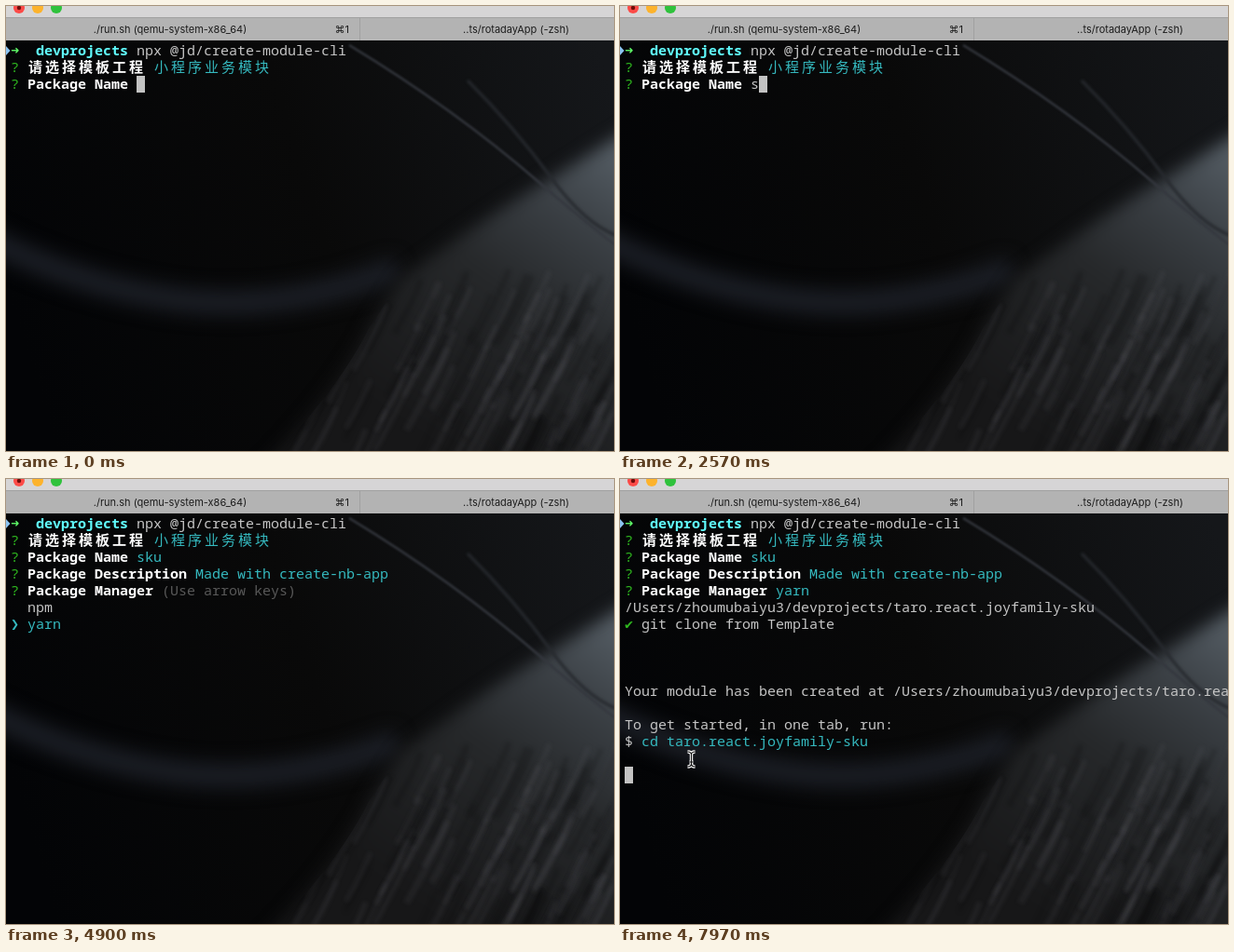
Write an HTML page with a canvas that moves like this. It is 652x478 px and loops after 8000 ms.

```html
<!DOCTYPE html>
<html lang="zh">
<head>
<meta charset="utf-8">
<title>Module generator in a terminal</title>
<style>
html, body { margin: 0; width: 100%; height: 100%; overflow: hidden; background: #050506; }
canvas { display: block; }
</style>
</head>
<body>
<canvas id="stage" width="652" height="478"></canvas>
<script>
const W = 652, H = 478, LOOP = 8000;
const CELL = 9, LINE = 18, LEFT = 5, TOP = 39;
const MONO = '"Noto Sans Mono", "DejaVu Sans Mono", "Noto Sans CJK SC", "Noto Sans CJK", monospace';
const COLOR = {
  plain: '#c5c5c5', bold: '#ffffff', teal: '#35b9bf', green: '#2fb81f',
  dim: '#585858', path: '#60fdff', arrow: '#5ffa68'
};
const WORKSPACE = 'devprojects';
const PROJECT = 'taro.react.joyfamily-sku';
const FOLDER = `/Users/zhoumubaiyu3/${WORKSPACE}/${PROJECT}`;

// Moments in the session, in ms
const NAMED = 3750, DESCRIBED = 4250, PICK_YARN = 4560, CLONE = 5080, DONE = 6050, POINTER = 6300;
const TYPING = [[0, ''], [900, 's'], [1050, 'sd'], [1350, 'sdk'], [1500, 'sdku'],
  [2100, 'sdk'], [2250, 'sd'], [2400, 's'], [2800, 'sk'], [2950, 'sku']];

const ctx = document.getElementById('stage').getContext('2d');
const backdrop = makeBackdrop();

function makeBackdrop() {
  const canvas = document.createElement('canvas');
  canvas.width = W;
  canvas.height = H;
  const c = canvas.getContext('2d');

  const gradient = (x0, y0, x1, y1, ...stops) => {
    const g = c.createLinearGradient(x0, y0, x1, y1);
    stops.forEach(([pos, color]) => g.addColorStop(pos, color));
    return g;
  };
  const stroke = (path, color, width, blur) => {
    c.filter = `blur(${blur}px)`;
    c.strokeStyle = color;
    c.lineWidth = width;
    c.stroke(new Path2D(path));
  };

  c.fillStyle = gradient(0, 300, W, 100, [0, '#030406'], [.5, '#090909'], [1, '#15171a']);
  c.fillRect(0, 0, W, H);

  stroke('M-30 245 Q80 303 190 316 T420 282', '#1b1e25', 26, 10);

  const fur = new Path2D('M425 292 Q510 230 560 200 T690 118 V520 H250 Q350 425 390 345 Z');
  c.filter = 'blur(9px)';
  c.fillStyle = gradient(640, 150, 430, 450,
    [0, '#535b62'], [.22, '#3b4045'], [.5, '#26282a'], [1, '#171718']);
  c.fill(fur);

  let seed = 7;
  const random = () => (seed = seed * 16807 % 2147483647) / 2147483647;
  c.save();
  c.clip(fur);
  for (let i = 0; i < 150; i++) {
    const x = 320 + random() * 350, y = 280 + random() * 180, length = 40 + random() * 50;
    const color = i % 2 ? 'rgba(125,130,135,.1)' : 'rgba(0,0,0,.16)';
    stroke(`M${x} ${y} q${-length * .15} ${length * .4} ${-length * .5} ${length}`, color, 3 + random() * 4, 2);
  }
  c.restore();

  stroke('M368 42 Q480 110 570 188 T665 262', '#34373e', 2.5, 1);
  stroke('M495 80 Q545 130 585 185 T665 250', '#272a2f', 3, 1.5);
  return canvas;
}

function label(text, x, align) {
  ctx.font = '11px Inter, "DejaVu Sans", sans-serif';
  ctx.textAlign = align;
  ctx.fillStyle = '#1c1c1c';
  ctx.fillText(text, x, 29);
}

function drawWindowBars() {
  ctx.fillStyle = '#d6d5d6';
  ctx.fillRect(0, 0, W, 13);
  ctx.fillStyle = '#b3b3b3';
  ctx.fillRect(0, 13, W, 24);
  ctx.fillStyle = '#a0a0a0';
  ctx.fillRect(0, 12, W, 1);
  ctx.fillRect(379, 13, 1, 24);
  const dot = (x, r, color) => {
    ctx.fillStyle = color;
    ctx.beginPath();
    ctx.arc(x, 2, r, 0, 7);
    ctx.fill();
  };
  dot(14, 6, '#fc4b48');
  dot(14, 2.2, '#6d0d0a');
  dot(34, 6, '#fdb32c');
  dot(54, 6, '#2fc23c');
  label('./run.sh (qemu-system-x86_64)', 176, 'center');
  label('⌘1', 368, 'right');
  label('..ts/rotadayApp (-zsh)', 547, 'center');
}

// Each part is [text, style]; wide characters take two cells.
function print(row, ...parts) {
  let col = 0;
  ctx.textAlign = 'left';
  for (const [text, style = 'plain'] of parts) {
    const wide = /[\u4e00-\u9fff]/.test(text);
    const heavy = ['bold', 'path', 'arrow'].includes(style);
    ctx.font = `${heavy ? 700 : 400} 15px ${MONO}`;
    ctx.letterSpacing = wide ? '3px' : '0px';
    ctx.fillStyle = COLOR[style];
    ctx.fillText(text, LEFT + col * CELL + (wide ? 1 : 0), TOP + row * LINE + 14);
    col += text.length * (wide ? 2 : 1);
  }
  ctx.letterSpacing = '0px';
  return col;
}

const ask = (row, question, ...answer) =>
  print(row, ['? ', 'green'], [question, 'bold'], [' '], ...answer);

function block(row, col) {
  ctx.fillStyle = '#c3c3c3';
  ctx.fillRect(LEFT + col * CELL, TOP + row * LINE, CELL, LINE);
}

function drawSession(t) {
  ctx.fillStyle = '#8cc4f2';
  ctx.fill(new Path2D('M0 43 L4.5 48 L0 53 Z'));
  print(0, ['➜', 'arrow'], ['  '], [WORKSPACE, 'path'], [' npx @jd/create-module-cli']);
  ask(1, '请选择模板工程', ['小程序业务模块', 'teal']);

  if (t < NAMED) {
    const typed = TYPING.findLast(([start]) => start <= t)[1];
    block(2, ask(2, 'Package Name', [typed]));
    return;
  }
  ask(2, 'Package Name', ['sku', 'teal']);

  const description = 'Made with create-nb-app';
  if (t < DESCRIBED) {
    block(3, ask(3, 'Package Description', [`(${description}) `, 'dim']));
    return;
  }
  ask(3, 'Package Description', [description, 'teal']);

  if (t < CLONE) {
    ask(4, 'Package Manager', ['(Use arrow keys)', 'dim']);
    const chosen = t < PICK_YARN ? 0 : 1;
    ['npm', 'yarn'].forEach((name, i) => {
      const style = i === chosen ? 'teal' : 'plain';
      print(5 + i, [i === chosen ? '❯' : ' ', style], [' ' + name, style]);
    });
    return;
  }
  ask(4, 'Package Manager', ['yarn', 'teal']);
  print(5, [FOLDER]);

  const spinner = '⠋⠙⠹⠸⠼⠴⠦⠧⠇⠏'[Math.floor((t - CLONE) / 80) % 10];
  print(6, t < DONE ? [spinner, 'teal'] : ['✔', 'green'], [' git clone from Template']);
  if (t < DONE) return;

  print(10, ['Your module has been created at ' + FOLDER]);
  print(12, ['To get started, in one tab, run:']);
  print(13, ['$ '], ['cd ' + PROJECT, 'teal']);
  block(15, 0);
}

function drawPointer(t) {
  if (t < POINTER) return;
  const p = Math.min(1, Math.max(0, (t - 6650) / 900));
  const ease = p * p * (3 - 2 * p);
  const beam = new Path2D('M-4 -8 Q0 -8 0 -5 Q0 -8 4 -8 M0 -5 V5 M-4 8 Q0 8 0 5 Q0 8 4 8 M-2 3 H2');
  ctx.save();
  ctx.translate(173.5 - 97 * ease, 298 + 3 * ease);
  for (const [color, width] of [['#ffffff', 3.4], ['#111111', 1.2]]) {
    ctx.strokeStyle = color;
    ctx.lineWidth = width;
    ctx.stroke(beam);
  }
  ctx.restore();
}

function frame() {
  const t = performance.now() % LOOP;
  ctx.drawImage(backdrop, 0, 0);
  drawWindowBars();
  drawSession(t);
  drawPointer(t);
  requestAnimationFrame(frame);
}
frame();
</script>
</body>
</html>
```
